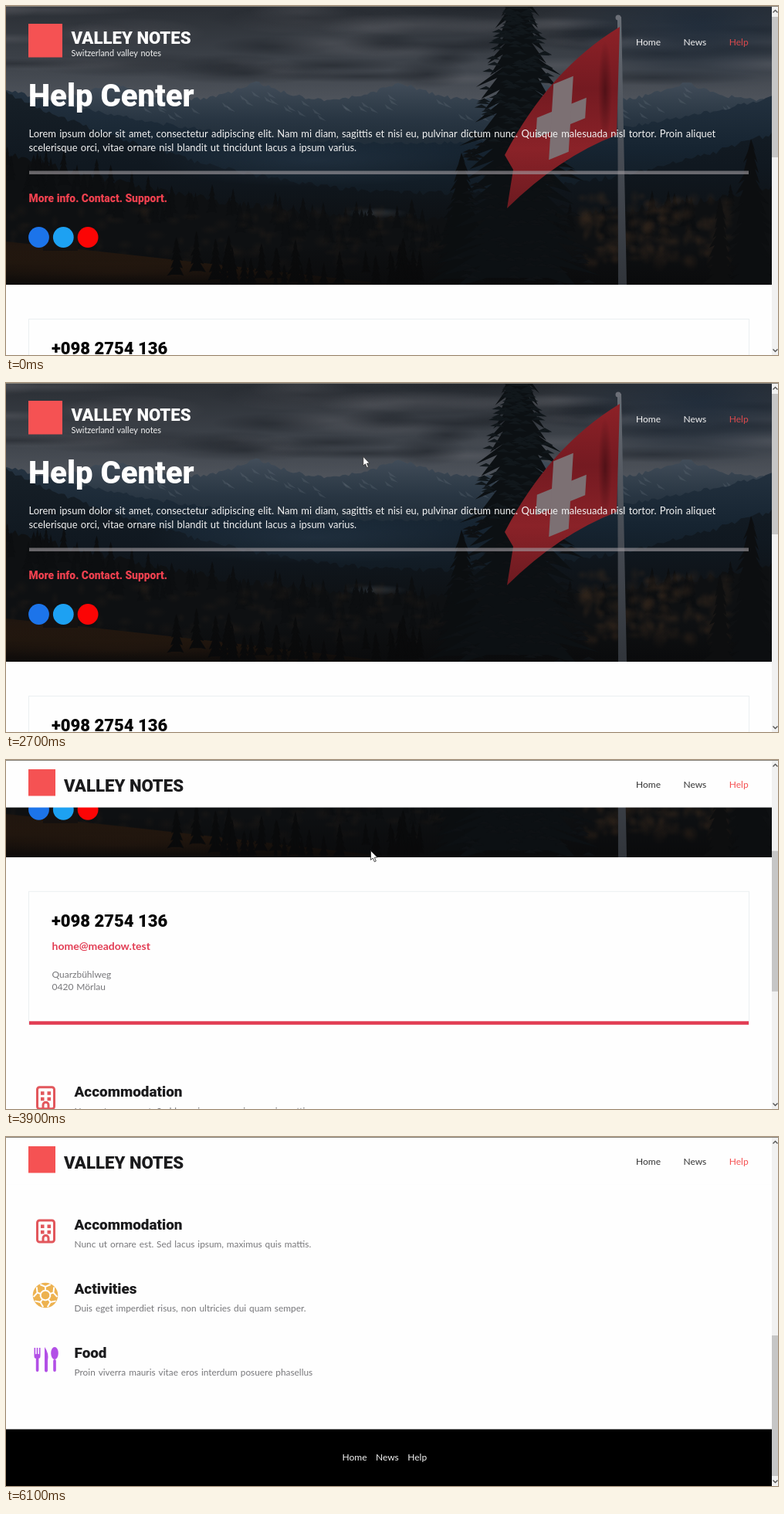
These frames come from a looping animation (1000 px wide and 452 px high, 6.8 s). An HTML page with a canvas:

```html
<!DOCTYPE html>
<html lang="en">
<head>
<meta charset="utf-8">
<title>Help Center</title>
<style>
  html, body { margin: 0; width: 100%; height: 100%; overflow: hidden; background: #fff; }
  canvas { display: block; }
</style>
</head>
<body>
<canvas id="stage" width="1000" height="452"></canvas>
<script>
const W = 992, H = 452, HERO = 361, LOOP = 6800, MAX_SCROLL = 551;
const RED = '#f55253', CRIMSON = '#e23c53', INK = '#1b1b1d', GREY = '#77777a', PALE = '#f3f3f3';
const POINTER_ON = 2000, POINTER_OFF = 5000, BAR_IN = 3600;
const g = document.getElementById('stage').getContext('2d');

const progress = (t, from, span) => Math.min(1, Math.max(0, (t - from) / span));

// Slow scrolling first, then a faster turn of the wheel.
function scrollAt(t) {
  return Math.min(MAX_SCROLL, 0.21 * Math.max(0, t - 2780) + 0.368 * Math.max(0, t - 3900));
}

// A short twitch upwards, then a glide that slows down.
function pointerAt(t) {
  const bob = Math.sin(Math.PI * progress(t, POINTER_ON, 200));
  const k = 1 - (1 - progress(t, 2500, 800)) ** 2.3;
  return [453 + 19 * k - 7 * bob, 74 + 43 * k - 18 * bob];
}

let seed = 11;
function rnd() {
  seed = (seed * 16807) % 2147483647;
  return seed / 2147483647;
}
const between = (a, b) => a + (b - a) * rnd();

function repeat(n, draw) {
  for (let i = 0; i < n; i++) draw(i);
}

function box(c, x, y, w, h, color) {
  c.fillStyle = color;
  c.fillRect(x, y, w, h);
}

function shape(c, pts, color) {
  c.beginPath();
  pts.forEach(([x, y]) => c.lineTo(x, y));
  c.closePath();
  c.fillStyle = color;
  c.fill();
}

function disc(c, x, y, r, color) {
  c.beginPath();
  c.arc(x, y, r, 0, 7);
  c.fillStyle = color;
  c.fill();
}

function fade(c, top, bottom, ...colors) {
  const f = c.createLinearGradient(0, top, 0, bottom);
  colors.forEach((v, i) => f.addColorStop(i / (colors.length - 1), v));
  return f;
}

// Soft elliptical patch, rgb given as "r,g,b".
function glow(c, x, y, rx, ry, rgb, alpha) {
  c.save();
  c.translate(x, y);
  c.scale(rx, ry);
  const f = c.createRadialGradient(0, 0, 0, 0, 0, 1);
  f.addColorStop(0, `rgba(${rgb},${alpha})`);
  f.addColorStop(1, `rgba(${rgb},0)`);
  box(c, -1, -1, 2, 2, f);
  c.restore();
}

// Ground lines: a row of pointed peaks, or a valley sagging between two ends.
const peaks = x => 121 - 22 * (1 - Math.abs(Math.sin(Math.PI * (x - 325) / 185)));
const valley = (left, right, sag) => x => {
  const u = x / W;
  return left + (right - left) * u + sag * 4 * u * (1 - u);
};

function ridge(c, line, color, rough) {
  const pts = [[0, HERO]];
  for (let x = 0; x <= W; x += 4) pts.push([x, line(x) + between(-rough, rough) / 2]);
  shape(c, [...pts, [W, HERO]], color);
}

function spruce(c, x, top, h, w, color, tiers, power = 0.8) {
  const left = [], right = [];
  for (let i = 1; i <= tiers; i++) {
    const k = i / tiers, y = top + h * k, reach = w * k ** power;
    const a = reach * between(0.7, 1.15), b = reach * between(0.7, 1.15);
    left.push([x - a, y + h * 0.02], [x - a * 0.5, y - h * 0.01]);
    right.push([x + b, y + h * 0.02], [x + b * 0.5, y - h * 0.01]);
  }
  shape(c, [[x, top], ...right, ...left.reverse()], color);
}

function woods(c, line, x0, x1, count, size, color) {
  repeat(count, () => {
    const x = between(x0, x1), h = size * between(0.6, 1.4);
    spruce(c, x, line(x) - h * 0.6 + rnd() * size, h, h * 0.22, color, 5);
  });
}

function paintSky(c) {
  box(c, 0, 0, W, HERO, fade(c, 0, 130, '#2a2e34', '#3b4047', '#51565e'));
  repeat(50, i => glow(c, between(0, W), between(0, 95), between(40, 150), between(7, 20),
    i % 2 ? '26,30,36' : '106,107,113', i % 2 ? 0.5 : 0.32));
  glow(c, 900, 25, 190, 85, '32,45,60', 0.85);
}

function paintHills(c) {
  ridge(c, peaks, fade(c, 90, 200, '#46515d', '#293643', '#1a2630'), 5);
  repeat(70, () => {
    const x = between(0, W), y = peaks(x) + between(3, 22);
    shape(c, [[x, y], [x + 12, y + 9], [x + 3, y + 6]], 'rgba(125,135,146,.2)');
  });
  ridge(c, valley(108, 118, 65), fade(c, 110, 260, '#243240', '#162431', '#10181f'), 5);
  ridge(c, valley(112, 165, 102), fade(c, 115, 300, '#161f27', '#101820', '#0d0f11'), 7);
  glow(c, 400, 200, 220, 34, '45,63,81', 0.42);
  glow(c, 480, 268, 40, 7, '70,78,86', 0.5);
  const slope = valley(190, 235, 62);
  ridge(c, slope, '#0e1012', 10);
  woods(c, slope, 0, W, 120, 34, '#0c0e10');
}

function paintGround(c) {
  repeat(110, () => glow(c, between(0, 560), between(260, 340), between(5, 15), between(4, 10), '44,34,26', 0.25));
  c.beginPath();
  c.moveTo(0, 305);
  c.quadraticCurveTo(220, 328, 500, HERO);
  c.lineTo(0, HERO);
  c.fillStyle = fade(c, 305, HERO, '#1e150f', '#2b1c10', '#19120d');
  c.fill();
  glow(c, 150, 345, 200, 14, '76,45,24', 0.35);
  box(c, 48, 292, 45, 25, '#151110');
  woods(c, () => 322, 215, 540, 34, 40, '#0a0b0c');
  repeat(150, () => glow(c, between(745, 935), between(245, 335), between(5, 13), between(5, 12), '68,48,32', 0.24));
  box(c, 0, 310, W, 51, fade(c, 310, HERO, 'rgba(8,8,9,0)', 'rgba(8,8,9,.65)'));
}

function paintTrees(c) {
  spruce(c, 590, 190, 165, 42, '#0b0e10', 14);
  spruce(c, 965, 172, 190, 42, '#0c0e10', 14);
  spruce(c, 925, 250, 110, 22, '#0d0e0f', 9);
  spruce(c, 664, -40, 396, 98, '#0c1013', 26, 0.6);
  repeat(300, () => {
    const k = rnd(), x = 664 + between(-95, 95) * k ** 0.6, y = 370 * k - 12;
    shape(c, [[x - 9, y + 4], [x, y], [x + 9, y + 5]], k < 0.5 ? '#11171b' : '#0e1114');
  });
}

function paintFlag(c) {
  shape(c, [[792, 14], [797, 14], [804, HERO], [793, HERO]],
    fade(c, 14, HERO, '#686d75', '#484d55', '#31353b'));
  disc(c, 793, 15, 3.5, '#6c6f77');
  c.beginPath();
  c.moveTo(795, 27);
  c.quadraticCurveTo(704, 82, 646, 193);
  c.lineTo(657, 212);
  c.lineTo(649, 262);
  c.quadraticCurveTo(716, 196, 791, 167);
  c.closePath();
  c.fillStyle = fade(c, 30, 262, '#8c2127', '#741a21', '#8a2228', '#6c1a20');
  c.fill();
  c.save();
  c.transform(32, -13, -3, 49, 719, 145);
  box(c, -1, -0.27, 2, 0.54, '#7c7073');
  box(c, -0.4, -1, 0.8, 2, '#7c7073');
  c.restore();
  glow(c, 776, 110, 9, 65, '45,8,13', 0.5);
}

function paintHero() {
  const cv = document.createElement('canvas');
  cv.width = W;
  cv.height = HERO;
  const c = cv.getContext('2d');
  [paintSky, paintHills, paintGround, paintTrees, paintFlag].forEach(paint => paint(c));
  return cv;
}

function text(str, x, y, size, color, weight = 400, font = 'Lato') {
  g.font = `${weight} ${size}px ${font}, sans-serif`;
  g.wordSpacing = font === 'Lato' ? size * 0.075 + 'px' : '0px';
  g.fillStyle = color;
  g.fillText(str, x, y);
  return g.measureText(str).width;
}

const title = (str, x, y, size, color) => text(str, x, y, size, color, 900, 'Roboto');

function menu(x, y, gap, color, last = color) {
  for (const item of ['Home', 'News', 'Help']) {
    x += text(item, x, y, 12, item === 'Help' ? last : color) + gap;
  }
}

function building(y) {
  const color = '#e2575c';
  g.strokeStyle = color;
  g.lineWidth = 3;
  g.beginPath();
  g.roundRect(40.5, y - 14, 22, 28, 3);
  g.stroke();
  repeat(4, i => box(g, 45 + 8.5 * (i % 2), y - 8.5 + 7.5 * (i >> 1), 4.5, 4.5, color));
  g.beginPath();
  g.moveTo(48, y + 14);
  g.arc(51.5, y + 9, 3.5, Math.PI, 0);
  g.lineTo(55, y + 14);
  g.stroke();
}

function ball(y) {
  disc(g, 51, y, 16.3, '#edb250');
  g.save();
  g.translate(51, y);
  g.strokeStyle = '#fff';
  g.lineWidth = 2;
  g.beginPath();
  repeat(5, () => {
    g.rotate(Math.PI * 2 / 5);
    g.moveTo(-3.8, -5.3);
    g.lineTo(0, -6.5);
    g.lineTo(3.8, -5.3);
    g.moveTo(0, -6.5);
    g.lineTo(0, -11);
    g.moveTo(-6.7, -14);
    g.lineTo(0, -11);
    g.lineTo(6.7, -14);
  });
  g.stroke();
  g.restore();
}

function cutlery(y) {
  const purple = '#b24fe6';
  repeat(3, i => box(g, 36.5 + 3.2 * i, y - 15, 1.6, 10, purple));
  g.beginPath();
  g.roundRect(36.5, y - 7, 8, 6, 3);
  g.roundRect(38.8, y - 4, 3.6, 20, 1.8);
  g.roundRect(61.2, y, 3.6, 16, 1.8);
  g.ellipse(63, y - 8, 4.8, 8, 0, 0, 7);
  g.fill();
  g.beginPath();
  g.moveTo(50, y - 16);
  g.quadraticCurveTo(56, y - 8, 54, y + 2);
  g.lineTo(54, y + 15);
  g.quadraticCurveTo(52, y + 18, 50, y + 15);
  g.fill();
}

const hero = paintHero();
const TOPICS = [
  ['Accommodation', 'Nunc ut ornare est. Sed lacus ipsum, maximus quis mattis.', building],
  ['Activities', 'Duis eget imperdiet risus, non ultricies dui quam semper.', ball],
  ['Food', 'Proin viverra mauris vitae eros interdum posuere phasellus', cutlery],
];
const INTRO = [
  'Lorem ipsum dolor sit amet, consectetur adipiscing elit. Nam mi diam, sagittis et nisi eu, ' +
    'pulvinar dictum nunc. Quisque malesuada nisl tortor. Proin aliquet',
  'scelerisque orci, vitae ornare nisl blandit ut tincidunt lacus a ipsum varius.',
];

function drawHero() {
  g.drawImage(hero, 0, 0);
  box(g, 29, 23, 44, 43.5, RED);
  title('VALLEY NOTES', 84.5, 49, 22.2, '#fff');
  text('Switzerland valley notes', 84.5, 65, 10.9, PALE);
  menu(816, 50.5, 29.5, PALE, '#d9494c');
  title('Help Center', 29, 130, 40, '#fff');
  INTRO.forEach((line, i) => text(line, 29.5, 169.5 + 18 * i, 12.94, PALE));
  box(g, 30, 213.5, 932, 4.5, 'rgba(165,160,166,.6)');
  title('More info. Contact. Support.', 29.5, 253.8, 13.9, '#f0414f');
  ['#1c74ea', '#1da1f2', '#fb0505'].forEach((color, i) => disc(g, 42.5 + i * 31.8, 299.5, 13.4, color));
}

function drawCard() {
  g.strokeStyle = '#ebeff1';
  g.lineWidth = 1;
  g.strokeRect(29.5, 405.5, 933, 172);
  box(g, 30, 573.5, 932, 4.5, CRIMSON);
  title('+098 2754 136', 59, 451, 22, '#060606');
  text('home@meadow.test', 59.5, 481, 14, CRIMSON, 700);
  text('Quarzbühlweg', 59.5, 517, 12, GREY);
  text('0420 Mörlau', 59.5, 533, 12, GREY);
}

function drawTopics() {
  TOPICS.forEach(([name, line, icon], i) => {
    const y = 673 + i * 83;
    icon(y);
    title(name, 88.5, y - 2.3, 18.9, INK);
    text(line, 88.5, y + 20.7, 11.85, GREY);
  });
}

function drawPage() {
  drawHero();
  drawCard();
  drawTopics();
  box(g, 0, 929.5, W, 80, '#000');
  menu(435.5, 970, 11.5, PALE);
}

function drawBar() {
  box(g, 0, 0, W, 61.5, '#fefefe');
  box(g, 29, 12, 35, 34.5, RED);
  title('VALLEY NOTES', 75, 40.7, 22.2, INK);
  menu(816, 35.5, 29.5, '#333', RED);
}

function chevron(y, dir) {
  g.strokeStyle = '#555';
  g.lineWidth = 1.4;
  g.beginPath();
  g.moveTo(993.5, y + 1.5 * dir);
  g.lineTo(996.5, y - 1.5 * dir);
  g.lineTo(999.5, y + 1.5 * dir);
  g.stroke();
}

function drawScrollbar(scroll) {
  box(g, W, 0, 8, H, '#f1f1f1');
  box(g, W, 14 + scroll * 243 / MAX_SCROLL, 8, 182, '#c6c6c6');
  chevron(7, 1);
  chevron(446, -1);
}

function drawPointer(x, y) {
  g.save();
  g.translate(x + 0.5, y + 0.5);
  shape(g, [[0, 0], [0, 12], [2.7, 9.5], [4.8, 14.3], [6.8, 13.4], [4.8, 8.8], [8.4, 8.6]], '#fff');
  g.strokeStyle = '#333';
  g.lineWidth = 0.9;
  g.stroke();
  g.restore();
}

function shifted(y, draw) {
  g.save();
  g.translate(0, y);
  draw();
  g.restore();
}

const start = performance.now();
function frame() {
  // The picture advances in tenths of a second.
  const t = Math.floor((performance.now() - start) % LOOP / 100) * 100;
  const scroll = scrollAt(t);
  box(g, 0, 0, 1000, H, '#fefefe');
  shifted(-scroll, drawPage);
  if (t >= BAR_IN) shifted(40 * (progress(t, BAR_IN, 200) - 1), drawBar);
  drawScrollbar(scroll);
  box(g, 0, 0, 1000, 1, '#87837a');
  if (t >= POINTER_ON && t < POINTER_OFF) drawPointer(...pointerAt(t));
  requestAnimationFrame(frame);
}
frame();
</script>
</body>
</html>
```
